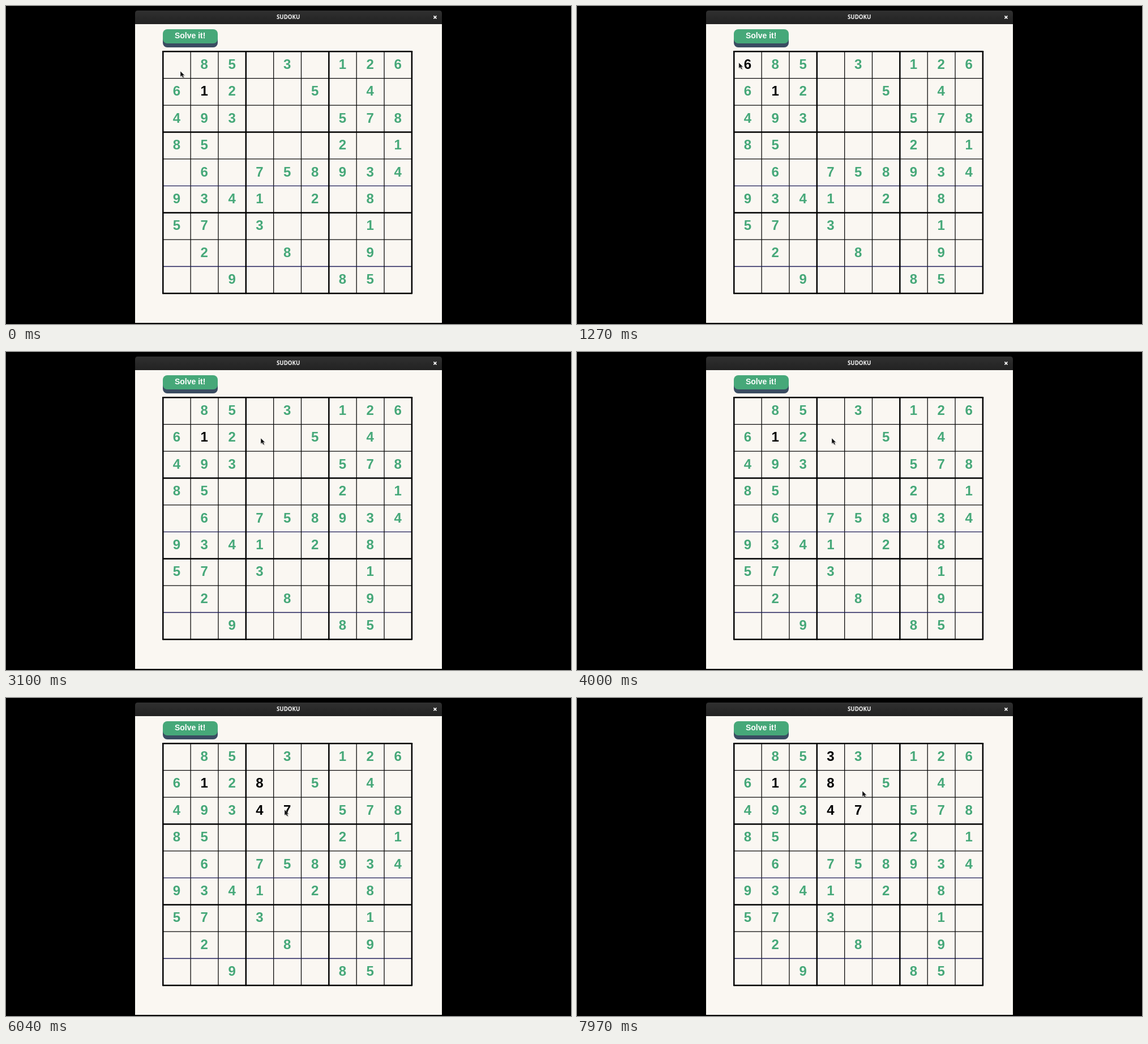
Write an HTML page that moves like this. It is 998 by 561 pixels and loops after 8 s.

```html
<!DOCTYPE html>
<html lang="en">
<head>
<meta charset="utf-8">
<title>Sudoku</title>
<style>
  html, body { margin: 0; width: 100%; height: 100%; overflow: hidden; background: #000; }
  svg { display: block; width: 100%; height: 100%; }
  text { text-anchor: middle; font-family: "Liberation Sans", Arial, sans-serif; font-weight: 700; }
  .digit { font-size: 24px; fill: #46a879; }
  .typed { fill: #000; }
  .label { font-size: 14px; fill: #fff; }
  .title { font: 700 9.7px "Noto Sans", "Open Sans", sans-serif; fill: #f4f4f4; }
</style>
</head>
<body>
<svg viewBox="0 0 998 561">
  <defs>
    <linearGradient id="bar" x2="0" y2="1">
      <stop stop-color="#303030"/>
      <stop offset="1" stop-color="#222"/>
    </linearGradient>
  </defs>
  <rect width="998" height="561"/>
  <rect x="228" y="30" width="542" height="529" fill="#faf7f2"/>
  <path d="M228 32V13q0-5 5-5H765q5 0 5 5V32Z" fill="url(#bar)"/>
  <text class="title" x="498.7" y="23">SUDOKU</text>
  <path d="M755.4 17.4l5 5m0-5l-5 5" stroke="#fff" stroke-width="1.6"/>
  <rect x="277" y="46" width="97" height="27" rx="8" fill="#3a4c62"/>
  <rect x="277" y="41" width="97" height="25" rx="8" fill="#46a879"/>
  <text class="label" x="325.2" y="57.3">Solve it!</text>
  <g id="grid" fill="none"></g>
  <g id="digits"></g>
  <g id="cursor">
    <path d="M1.2 1.5V11.5L3.8 9.3 5.6 13 7.6 12 6 8.6 9 8.2Z" fill="#000" opacity=".18"/>
    <path d="M0 0V10L2.4 7.8 4.2 11.6 6 10.8 4.4 7.2H7.4Z" fill="#111" stroke="#fff" stroke-opacity=".55" stroke-width=".7"/>
  </g>
</svg>
<script>
const LOOP = 8000;
const LEFT = 277.3, TOP = 80.3, CELL_W = 48.84, CELL_H = 47.4;
const board = [
  ".85.3.126", "6.2..5.4.", "493...578",
  "85....2.1", ".6.758934", "9341.2.8.",
  "57.3...1.", ".2..8..9.", "..9...85.",
];
// row, column, digit, shown from, shown until
const entries = [
  [1, 1, 1, 0, LOOP],
  [0, 0, 6, 560, 1680],
  [1, 3, 8, 4330, LOOP],
  [2, 3, 4, 5200, LOOP],
  [2, 4, 7, 5900, LOOP],
  [0, 3, 3, 7080, LOOP],
];
// time, x, y of the pointer tip
const path = [
  [0, 308, 115], [900, 308, 115], [1230, 286, 100], [1400, 285, 100],
  [1750, 302, 108], [2200, 436, 200], [2300, 439, 195], [2700, 450, 152],
  [4350, 450, 152], [4700, 450, 197], [5250, 450, 197], [5600, 492, 197],
  [6150, 492, 197], [6700, 450, 105], [7150, 450, 105], [7700, 504, 164],
  [LOOP, 504, 164],
];

const $ = id => document.getElementById(id);

function add(parent, tag, attrs, text = "") {
  const el = document.createElementNS("http://www.w3.org/2000/svg", tag);
  for (const key in attrs) el.setAttribute(key, attrs[key]);
  el.textContent = text;
  parent.append(el);
  return el;
}

function addDigit(row, col, digit, cls) {
  const x = 301.4 + CELL_W * col, y = 111 + CELL_H * row;
  return add($("digits"), "text", { class: cls, x, y }, digit);
}

function drawGrid() {
  const right = LEFT + CELL_W * 9, bottom = TOP + CELL_H * 9;
  const line = (d, i, thin) => add($("grid"), "path", {
    d, stroke: i % 3 ? thin : "#000", "stroke-width": i % 3 ? 1.3 : 2.5,
    "stroke-linecap": "round",
  });
  for (const thick of [false, true]) {
    for (let i = 0; i < 10; i++) {
      if ((i % 3 === 0) !== thick) continue;
      const navy = i === 5 || i === 8;
      line(`M${LEFT} ${TOP + CELL_H * i}H${right}`, i, navy ? "#1c1c58" : "#0a0a0a");
      line(`M${LEFT + CELL_W * i} ${TOP}V${bottom}`, i, "#0a0a0a");
    }
  }
}

function pointerAt(t) {
  const i = Math.max(1, path.findIndex(p => p[0] > t));
  const [t0, x0, y0] = path[i - 1], [t1, x1, y1] = path[i];
  const k = (t - t0) / (t1 - t0), e = k * k * (3 - 2 * k);
  return [x0 + (x1 - x0) * e, y0 + (y1 - y0) * e];
}

drawGrid();
board.forEach((line, row) => [...line].forEach((ch, col) => {
  if (ch !== ".") addDigit(row, col, ch, "digit");
}));
const typed = entries.map(([row, col, digit, from, to]) =>
  ({ el: addDigit(row, col, digit, "digit typed"), from, to }));

function render(t) {
  for (const { el, from, to } of typed)
    el.setAttribute("visibility", t >= from && t < to ? "visible" : "hidden");
  $("cursor").setAttribute("transform", `translate(${pointerAt(t)})`);
}

const start = performance.now();
function tick() {
  render((performance.now() - start) % LOOP);
  requestAnimationFrame(tick);
}
tick();
</script>
</body>
</html>
```
